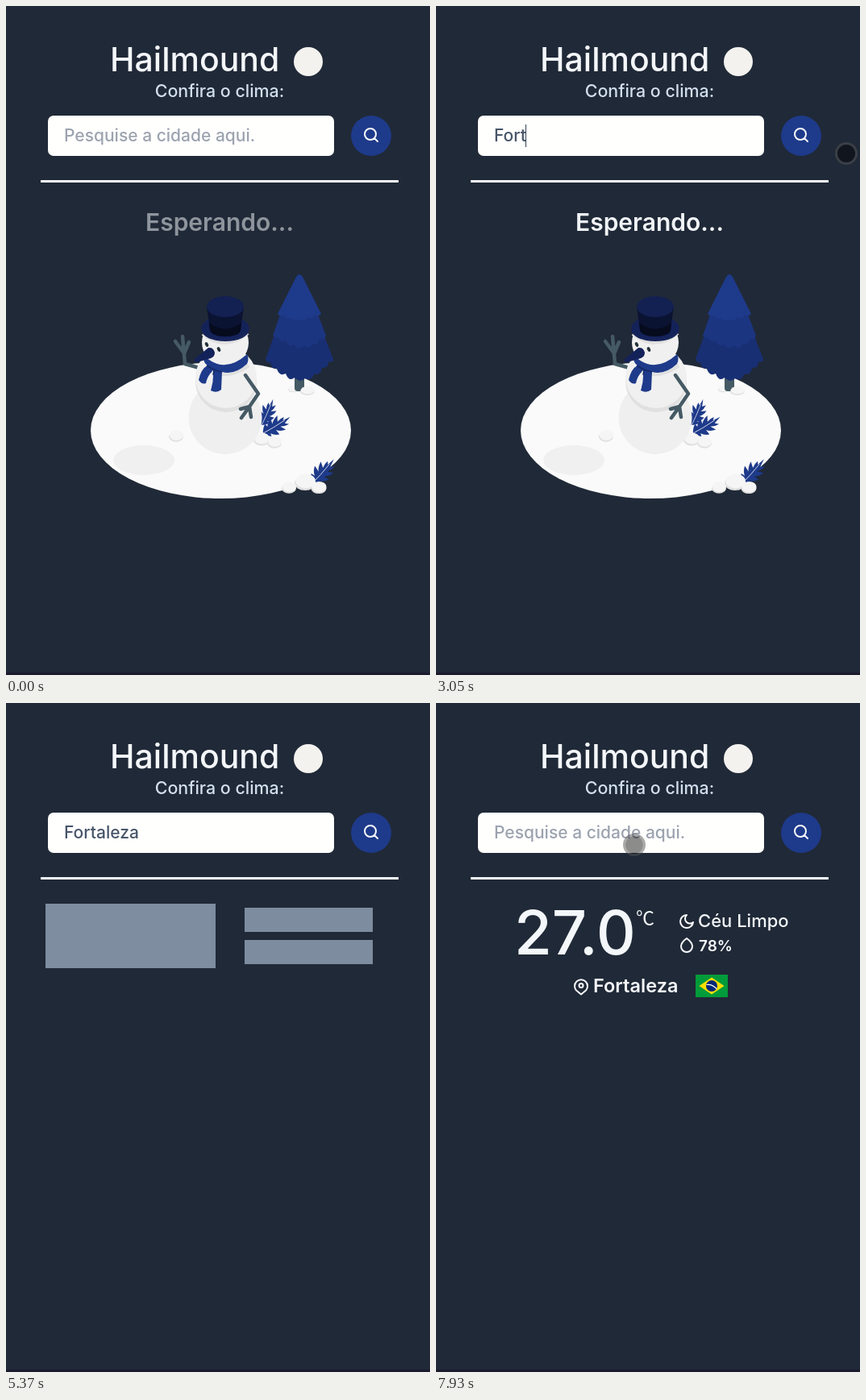
These frames come from a looping animation (526 px wide and 830 px high, 8 s). An HTML page:

```html
<!DOCTYPE html>
<html lang="pt">
<head>
<meta charset="utf-8">
<style>
  html, body { margin: 0; width: 100%; height: 100%; overflow: hidden; background: #202937; }
  svg { display: block; }
  text { font: 500 21px Inter, sans-serif; fill: #f4f7fa; white-space: pre; }
  .mid { text-anchor: middle; }
  .icon { fill: none; stroke: #f8fafc; stroke-width: 2; stroke-linecap: round; stroke-linejoin: round; }
  .wood { fill: none; stroke: #455a64; stroke-width: 4.5; stroke-linecap: round; stroke-linejoin: round; }
</style>
</head>
<body>
<svg width="526" height="830" viewBox="0 0 526 830">
  <defs>
    <g id="leaf">
      <path fill="#1e3a8a" d="M0 0Q-5-2-9-8L-4-9Q-9-11-12-18L-4-16Q-8-19-10-27L-3-23Q-5-28-4-33L-1-30 0-40 3-30 7-34Q7-28 4-23L11-27Q10-20 5-16L12-17Q10-11 5-8L9-7Q5-2 0 0Z"/>
      <path fill="none" stroke="#e8ecf5" stroke-width=".8" d="M0 2Q1-14 0-32"/>
    </g>
    <g id="stone">
      <ellipse cy="1.5" rx="10" ry="7" fill="#e0e0e0"/>
      <ellipse cx=".5" cy="-.5" rx="9.5" ry="7" fill="#f5f5f5"/>
    </g>
  </defs>
  <rect width="526" height="830" fill="#202937"/>
  <rect y="827" width="526" height="3" fill="#1c1a2e"/>

  <text x="129" y="81" style="font-size:41px">Hailmound</text>
  <circle cx="375" cy="69" r="18" fill="#f3f2ef"/>
  <text class="mid" x="265" y="113" style="font-size:21.4px;fill:#d3dfee">Confira o clima:</text>
  <rect x="52" y="136" width="355" height="50" rx="7" fill="#fffffe"/>
  <text id="field" x="72" y="168"></text>
  <rect id="caret" y="147" width="1" height="28" fill="#334155"/>
  <circle cx="453" cy="161" r="25" fill="#1e3a8a"/>
  <path class="icon" d="M445 159a7 7 0 1 0 14 0a7 7 0 1 0-14 0M457 164l4 4"/>
  <rect x="43" y="216" width="444" height="3" fill="#f8fafc"/>

  <g id="waiting">
    <text id="wait" class="mid" x="265" y="279" style="font-size:30px;font-weight:600">Esperando...</text>
    <ellipse cx="266.5" cy="526.5" rx="161.5" ry="84.5" fill="#fafafa"/>
    <ellipse cx="171" cy="563.5" rx="38" ry="18.5" fill="#f0f0f0"/>

    <use href="#stone" transform="translate(356 475)scale(.6 .5)"/>
    <rect x="358" y="450" width="12" height="28" rx="4" fill="#455a64"/>
    <use href="#stone" transform="translate(374 477)scale(.9 .7)"/>
    <path fill="#182f74" d="M334 405L322 438q2 6 6 4q1 9 8 8q3 10 11 6q4 11 11 5q7 7 13 1q8 4 11-5q9 1 10-8q8 1 8-8q6 2 6-3L393 405Z"/>
    <path fill="#1c3580" d="M341 380L331 409q3 4 7 2q3 8 9 4q4 9 10 5q6 8 13 1q6 6 11-2q6 3 8-6q6 2 8-4L386 380Z"/>
    <path fill="#1e3a8a" d="M360 336Q364 330 368 336L391 382q-3 4-8 1q-3 7-9 3q-5 8-10 2q-6 5-10-1q-6 3-9-3q-5 2-8-2Z"/>

    <use href="#stone" transform="translate(211 533)scale(.9)"/>
    <use href="#leaf" transform="translate(317 520)rotate(24)scale(.88)"/>
    <use href="#leaf" transform="translate(319 530)rotate(59)scale(.98)"/>
    <use href="#stone" transform="translate(317 537)"/>
    <use href="#stone" transform="translate(333 541)scale(.9)"/>
    <use href="#leaf" transform="translate(380 592)rotate(42)"/>
    <use href="#stone" transform="translate(371 590)scale(1.3)"/>
    <use href="#stone" transform="translate(351 597)scale(.9)"/>
    <use href="#stone" transform="translate(388 597)scale(.95)"/>

    <circle cx="272" cy="510.5" r="45.5" fill="#efefef"/>
    <circle cx="273" cy="466" r="38" fill="#e0e0e0"/>
    <path class="wood" d="M240 449L222 444 219 410M221 431L210 416M221 431L227 417"/>
    <circle cx="273" cy="461" r="38" fill="#f0f0f0"/>
    <path fill="none" stroke="#e0e0e0" stroke-width="5" d="M246 449Q272 466 301 446"/>
    <circle cx="272" cy="417.5" r="29" fill="#f0f0f0"/>
    <path fill="none" stroke="#e0e0e0" stroke-width="4" d="M244 407Q272 429 300 406"/>
    <path fill="#1e3a8a" d="M245 433Q270 458 299 432Q302 438 299 444Q284 458 268 454L267 476Q261 481 254 477Q258 464 257 452Q250 458 248 468Q243 470 239 464Q242 450 250 446Q244 442 245 433Z"/>
    <path fill="none" stroke="#142764" stroke-width="1.5" d="M249 446Q260 453 268 454M258 452l-1 6"/>
    <path fill="#16245a" d="M242.500 398v4a29.500 14 0 0 0 59 0v-4Z"/>
    <ellipse cx="272" cy="399" rx="29.5" ry="14" fill="#14225a"/>
    <path fill="#0b1333" d="M249 373L253 402a19 8 0 0 0 38 0L295 373Z"/>
    <path fill="#060b1e" d="M252 393Q272 408 292 393L291 402a19 8 0 0 1-38 0Z"/>
    <ellipse cx="272" cy="373" rx="23" ry="13" fill="#132052"/>
    <ellipse cx="249" cy="420" rx="2" ry="3" fill="#263238" transform="rotate(-25 249 420)"/>
    <ellipse cx="264" cy="426" rx="2" ry="3" fill="#263238" transform="rotate(-25 264 426)"/>
    <path fill="#14225a" d="M234 438L251 424Q257 423 259 430Q259 435 254 437L237 442Q232 442 234 438Z"/>
    <path class="wood" d="M297 458L313 481 302 497 292 511M302 497L291 500M302 497L304 510"/>
  </g>

  <g id="bones" fill="#94a3b8">
    <rect x="49" y="249" width="211" height="80"/>
    <rect x="296" y="254" width="159" height="30"/>
    <rect x="296" y="294" width="159" height="30"/>
  </g>

  <g id="result">
    <text x="97" y="312" style="font-size:76px">27.0</text>
    <text x="248" y="275" style="font:400 23px 'Noto Sans CJK JP','Noto Sans CJK',sans-serif">℃</text>
    <path class="icon" d="M311 263a8 8 0 1 0 8 9a6 6 0 0 1-8-9Z"/>
    <text x="325" y="278" style="font-size:22px">Céu Limpo</text>
    <path class="icon" d="M311 292q-7 5-7 10a7 7 0 0 0 14 0q0-5-7-10Z"/>
    <text x="326" y="308" style="font-size:19px;font-weight:600">78%</text>
    <path class="icon" d="M180 361.500l-6-5a8 8 0 1 1 12 0ZM177.500 350.500a2.500 2.500 0 1 0 5 0a2.500 2.500 0 1 0-5 0"/>
    <text x="195" y="359" style="font-size:23.5px;font-weight:600">Fortaleza</text>
    <rect x="322" y="337" width="40" height="28" fill="#009b3a"/>
    <path fill="#fedf00" d="M326.500 351l15.500-10.500 15.500 10.500-15.500 10.500Z"/>
    <circle cx="342" cy="351" r="7" fill="#002776"/>
    <path fill="none" stroke="#fff" stroke-width="1.2" d="M335.500 349.500q7-1 12.500 5"/>
  </g>

  <g id="dot">
    <circle r="12.5" fill="none" stroke="#555" stroke-width="3" stroke-opacity=".5"/>
    <circle r="11" fill-opacity=".45"/>
  </g>
  <circle id="press" r="15" fill="#c8b900" fill-opacity=".65"/>
  <g id="mover" stroke="#fff" stroke-width="3" paint-order="stroke">
    <path d="M0-9l4 4h-3v4h4v-3l4 4-4 4v-3h-4v4h3l-4 4-4-4h3v-4h-4v3l-4-4 4-4v3h4v-4h-3Z"/>
  </g>
</svg>
<script>
const el = id => document.getElementById(id);
const show = (id, on) => el(id).style.display = on ? '' : 'none';
const within = (t, a, b) => t >= a && t < b;

const CITY = 'Fortaleza';
const KEYS = [1810, 1940, 2570, 2840, 3250, 3520, 3590, 3870, 4150];
const FOCUS = 790, CLICK = 4820, LOAD = 4950, DONE = 6940;
// Pointer trips: [time, x, y] points
const TRIPS = [
  [[70, 482, 836], [300, 440, 560], [560, 320, 230], [720, 285, 165], [930, 285, 165],
   [1180, 420, 172], [1390, 509, 183], [4280, 509, 183], [4350, 501, 183],
   [4560, 485, 176], [4760, 459, 159], [5030, 459, 159], [5090, 511, 178], [5170, 545, 178]],
  [[5800, 545, 178], [5930, 490, 178], [6200, 340, 178], [6380, 285, 178], [6800, 285, 178],
   [7000, 300, 172], [7250, 275, 182], [7600, 248, 181], [7800, 246, 176], [8000, 246, 176]]
];

// Opacity 1 -> .5 -> 1 over 2 s, eased by cubic-bezier(.4, 0, .6, 1)
function pulse(t, start) {
  const p = (((t - start) / 1000) % 2 + 2) % 2, x = p < 1 ? p : 2 - p;
  let s = x;
  for (let i = 0; i < 4; i++)
    s -= (1.2 * s - .6 * s * s + .4 * s ** 3 - x) / (1.2 - 1.2 * s + 1.2 * s * s);
  return 1 - .5 * s * s * (3 - 2 * s);
}

function pointer(t) {
  const trip = TRIPS.find(p => within(t, p[0][0], p[p.length - 1][0]));
  if (!trip) return null;
  const i = trip.findIndex(p => p[0] > t), [a, ax, ay] = trip[i - 1], [b, bx, by] = trip[i];
  const k = (t - a) / (b - a);
  return [ax + (bx - ax) * k, ay + (by - ay) * k];
}

function draw(t) {
  const typed = t < DONE ? KEYS.filter(k => k <= t).length : 0;
  const field = el('field');
  field.textContent = typed ? CITY.slice(0, typed) : 'Pesquise a cidade aqui.';
  field.style.fill = typed ? '#475569' : '#9ca3af';

  const since = t - (typed ? KEYS[typed - 1] : FOCUS);
  show('caret', within(t, FOCUS, CLICK) && since % 1000 < 500);
  el('caret').setAttribute('x', 72 + (typed ? Math.floor(field.getComputedTextLength()) : 0));

  show('waiting', t < LOAD);
  show('bones', within(t, LOAD, DONE));
  show('result', t >= DONE);
  el('wait').style.opacity = pulse(t, 1150);
  el('bones').style.opacity = pulse(t, LOAD);

  const pos = pointer(t);
  const kind = within(t, 740, 860) || within(t, CLICK, LOAD) ? 'press'
    : within(t, 1670, 1810) ? 'mover' : 'dot';
  for (const id of ['dot', 'press', 'mover']) {
    show(id, pos && id === kind);
    if (pos) el(id).setAttribute('transform', `translate(${pos})`);
  }
}

const begin = performance.now();
function tick() {
  draw((performance.now() - begin) % 8000);
  requestAnimationFrame(tick);
}
tick();
</script>
</body>
</html>
```
